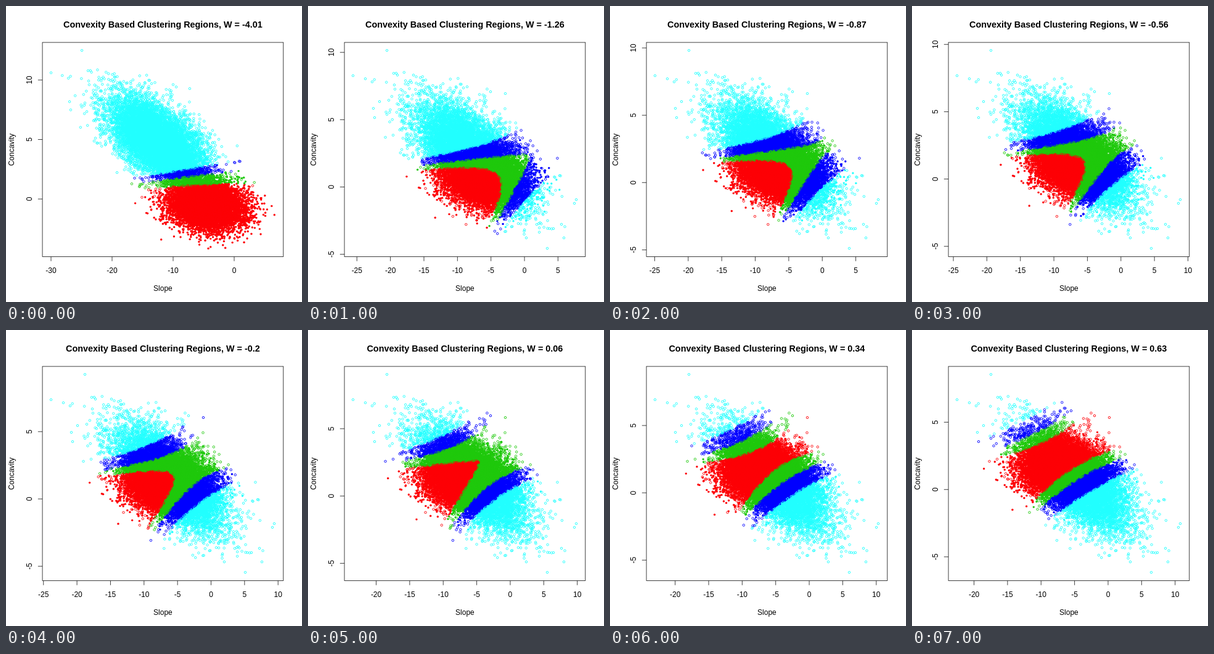
Recreate the animation shown at these times as an HTML page with a canvas. Size 480x480 px, loop 8000 ms.

```html
<!DOCTYPE html>
<html lang="en">
<head>
<meta charset="utf-8">
<title>Clustering regions</title>
<style>
  html, body { margin: 0; width: 100%; height: 100%; overflow: hidden; background: #fff; }
  canvas { display: block; width: 480px; height: 480px; }
</style>
</head>
<body>
<canvas id="stage" width="480" height="480"></canvas>
<script>
const SIZE = 480, HOLD = 1000, LINE = 0.75;
const FONT = '"Liberation Sans", Arial, sans-serif';
const COLORS = ['#fd0006', '#1fc90c', '#0000ff', '#22ffff'];
const BOX = { left: 59.04, top: 59.04, right: 449.76, bottom: 406.56 };

// Colour borders are level curves of a hyperbola: centre, the slopes of its
// asymptotes, and the levels between red, green, blue and cyan.
const states = [
  { w: -4.01, c: [560, 246], m: [0.12, 1.8], levels: [-5800, 400, 5800], wide: true },
  { w: -1.26, c: [370, 236], m: [0.12, 1.8], levels: [-2250, -80, 3600] },
  { w: -0.87, c: [350, 226], m: [0.12, 1.64], levels: [-1740, 200, 3950] },
  { w: -0.56, c: [333, 218], m: [0.12, 1.5], levels: [-1300, 600, 4300] },
  { w: -0.2, c: [306, 214], m: [0.13, 1.5], levels: [-520, 1300, 5200] },
  { w: 0.06, c: [284.5, 209], m: [0.12, 1.65], levels: [-30, 2600, 6600] },
  { w: 0.34, c: [268, 202], m: [0.16, 1.42], levels: [600, 3000, 7400] },
  { w: 0.63, c: [252, 195], m: [0.2, 1.2], levels: [1250, 3450, 8200] }
];

function randomSource(seed) {
  return () => {
    seed = (seed + 0x6d2b79f5) | 0;
    let t = Math.imul(seed ^ (seed >>> 15), 1 | seed);
    t = (t + Math.imul(t ^ (t >>> 7), 61 | t)) ^ t;
    return ((t ^ (t >>> 14)) >>> 0) / 4294967296;
  };
}
const random = randomSource(41);

function normalPair() {
  const r = Math.sqrt(-2 * Math.log(1 - random()));
  const a = random() * 2 * Math.PI;
  return [r * Math.cos(a), r * Math.sin(a)];
}

// Slanted cloud of rings, in pixels.
function makeRings(count) {
  const cos = Math.cos(0.733), sin = Math.sin(0.733);
  const points = [
    [73, 113], [93, 118], [104, 123], [128, 72], [435, 314], [432, 320],
    [388, 393], [415, 376], [296, 139], [258, 131], [116, 155], [106, 166],
    [108, 181], [143, 109], [145, 112], [171, 112], [140, 128], [411, 354],
    [408, 275], [398, 361], [354, 376]
  ];
  while (points.length < count) {
    const [a, b] = normalPair();
    const x = 266 + 52 * a * cos - 26 * b * sin;
    const y = 241 + 52 * a * sin + 26 * b * cos;
    if (x > 106 && x < 420 && y > 100 && y < 374) points.push([x, y]);
  }
  return points;
}

// Flat, slightly tilted cloud of dots, in standard deviations.
function makeDots(count) {
  const points = [[-3.92, -0.15], [3.68, 0.83], [0.07, 3.65], [1.0, 3.6], [-2.5, 2.9]];
  while (points.length < count) {
    const [a, b] = normalPair();
    if (Math.hypot(a, b) < 3.6) points.push([a, 0.15 * a + 0.99 * b]);
  }
  return points;
}

const rings = makeRings(11000);
const dots = makeDots(10000);

function axesFor({ w, wide }) {
  return wide
    ? { x0: 370, y0: 313, kx: 9.9, ky: 19.3, stepX: 10 }
    : { x0: 329 - 17.5 * w, y0: 270.3 - 18.4 * w, kx: 10.87, ky: 21.83, stepX: 5 };
}

function regionAt(x, y, { c, m, levels }) {
  const dx = x - c[0], dy = y - c[1];
  const side = dy + m[1] * dx;
  const value = (dy + m[0] * dx) * side;
  const i = levels.findIndex(level => value < level && (level > 0 || side < 0));
  return i < 0 ? 3 : i;
}

function drawPoints(g, state, axes) {
  const { w, wide } = state;
  const cx = axes.x0 + axes.kx * (-6.45 - 0.5 * w);
  const cy = axes.y0 - axes.ky * (1.14 + 0.41 * w);
  for (const [a, b] of dots) {
    const x = cx + 3 * axes.kx * a, y = cy + axes.ky * b;
    g.fillStyle = COLORS[regionAt(x, y, state)];
    g.beginPath();
    g.arc(x, y, 1.7, 0, 2 * Math.PI);
    g.fill();
  }
  g.lineWidth = 0.9;
  for (const [px, py] of rings) {
    const x = wide ? 73 + (px - 73) / 1.098 : px;
    const y = wide ? 72 + (py - 72) / 1.13 : py;
    g.strokeStyle = COLORS[regionAt(x, y, state)];
    g.beginPath();
    g.arc(x, y, 1.75, 0, 2 * Math.PI);
    g.stroke();
  }
}

function line(g, x1, y1, x2, y2) {
  g.beginPath();
  g.moveTo(x1, y1);
  g.lineTo(x2, y2);
  g.stroke();
}

function upright(g, text, x, y) {
  g.save();
  g.translate(x, y);
  g.rotate(-Math.PI / 2);
  g.fillText(text, 0, 0);
  g.restore();
}

function drawFrame(g, state, axes) {
  const { left, top, right, bottom } = BOX;
  g.strokeStyle = g.fillStyle = '#000';
  g.lineWidth = LINE;
  g.textAlign = 'center';
  g.strokeRect(left, top, right - left, bottom - top);

  g.font = 'bold 14.4px ' + FONT;
  g.fillText('Convexity Based Clustering Regions, W = ' + state.w, 254.4, 35);
  g.font = '12px ' + FONT;
  g.fillText('Slope', 254.4, 462);
  upright(g, 'Concavity', 12.5, 233);

  for (let v = -30; v <= 10; v += axes.stepX) {
    const x = axes.x0 + axes.kx * v;
    if (x < left || x > right) continue;
    line(g, x, bottom, x, bottom + 7.2);
    g.fillText(v, x, 433);
  }
  for (let v = -5; v <= 10; v += 5) {
    const y = axes.y0 - axes.ky * v;
    if (y < top || y > bottom) continue;
    line(g, left, y, left - 7.2, y);
    upright(g, v, 42, y);
  }
}

function render(state) {
  const canvas = document.createElement('canvas');
  canvas.width = canvas.height = SIZE;
  const g = canvas.getContext('2d');
  const axes = axesFor(state);
  g.fillStyle = '#fff';
  g.fillRect(0, 0, SIZE, SIZE);
  drawPoints(g, state, axes);
  drawFrame(g, state, axes);
  return canvas;
}

const stage = document.getElementById('stage').getContext('2d');
const pictures = [];
const start = performance.now();
let shown = -1;

function tick() {
  const i = Math.floor((performance.now() - start) / HOLD) % states.length;
  if (i !== shown) {
    pictures[i] = pictures[i] || render(states[i]);
    stage.drawImage(pictures[i], 0, 0);
    shown = i;
  }
  requestAnimationFrame(tick);
}
tick();
</script>
</body>
</html>
```
